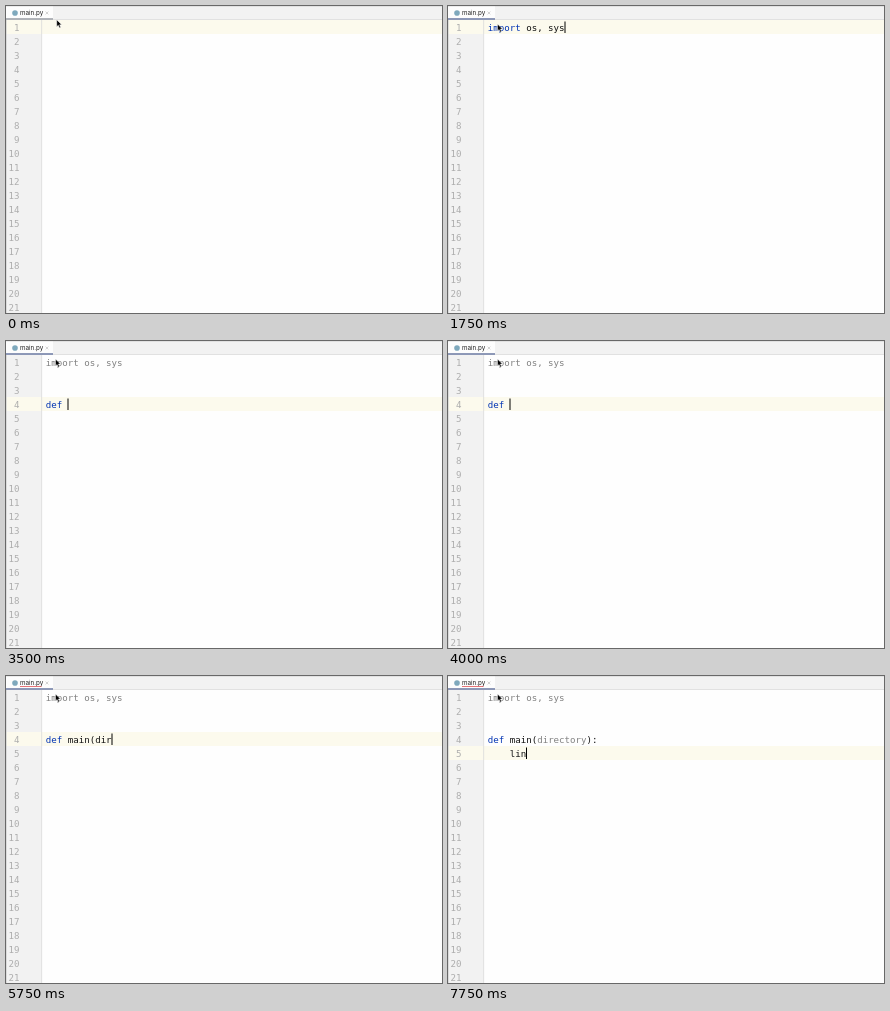
Animation, 436 px wide and 307 px high, one loop 8 s. Source, as an HTML page:

```html
<!DOCTYPE html>
<html lang="en">
<head>
<meta charset="utf-8">
<title>Code completion</title>
<style>
html, body { margin: 0; height: 100%; overflow: hidden; background: #fefefe; }
svg { display: block; }
text { font: 9.13px "DejaVu Sans Mono", "Noto Sans Mono", monospace; white-space: pre; fill: #111; }
.ui { font: 6.3px Inter, Roboto, sans-serif; fill: #222; }
.num { fill: #adadad; text-anchor: end; }
.k { fill: #0033b3; }
.g { fill: #808080; }
.m { fill: #2a62c0; }
.end { text-anchor: end; }
</style>
</head>
<body>
<svg id="stage" width="436" height="307" viewBox="0 0 436 307"></svg>
<script>
const CHAR = 5.5, LEFT = 39.7, LINE = 14, ROW = 12.55, LOOP = 8000;
const stage = document.getElementById('stage');

const rect = (x, y, w, h, fill, more = '') =>
  `<rect x="${x}" y="${y}" width="${w}" height="${h}" fill="${fill}" ${more}/>`;
const text = (x, y, s, cls = '') => `<text x="${x}" y="${y}" class="${cls}">${s}</text>`;
const span = (cls, s) => `<tspan class="${cls}">${s}</tspan>`;
const dot = (x, y, r, fill) => `<circle cx="${x}" cy="${y}" r="${r}" fill="${fill}"/>`;
const plain = s => s.replace(/<[^>]*>/g, '');

// Popup: col is where the typed prefix starts, line is the edited line.
const popup = (col, line, prefix, w, h, items, hint) => ({ col, line, prefix, w, h, items, hint });
const pops = {
  imp: popup(0, 1, 'i', 265, 155, ['import os, sys', 'import os', 'import sys', 'import re', 'import json',
    'import argparse', 'import time', 'import math', 'import random', 'import csv', 'import logging', 'import glob']),
  def: popup(0, 4, 'd', 265, 155, ['def ', 'def main():', 'def main(argv):', 'def main(args):', 'def run():',
    'def read(path):', 'def usage():', 'def walk(path):', 'def parse():', 'def test():', 'def init():', 'def load():']),
  name: popup(4, 4, '', 251, 137, ['main():', 'main(argv):', 'main(args):', 'main(argv=None):', 'main() -> None:',
    'usage():', 'run():', 'walk(path):', 'parse():', 'read(path):']),
  main: popup(4, 4, 'main', 225.5, 155, ['main', 'main():', 'main(argv=None):', 'main(args):', 'main() -> None:',
    'main() -> None:"""', 'main(argv):', 'main(argv=None): ->', 'main(argv=None): :', 'main(argv=None): >>',
    'main(argv=None): as', 'main(opts):'], "if __name__ == '__main__'"),
  dir: popup(9, 4, 'dir', 265, 137, ['directory', 'dir', 'dirname', 'dir_path', 'dirs', 'directory=None',
    'directories', 'dir_name', 'directory: str', 'dirpath'])
};

const imp = span('k', 'import') + ' os, sys';
const grey = span('g', 'import os, sys');
const def = span('k', 'def');
const top4 = s => [grey, '', '', s];
const sig = top4(def + ' main(directory):');
const used = top4(`${def} main(${span('g', 'directory')}):`);

// [start ms, lines (caret sits at the end of the last), popup]
const steps = [
  [0, ['']],
  [750, ['i']],
  [1250, ['i'], 'imp'],
  [1750, [imp]],
  [2000, [grey]],
  [2250, [grey, '', '']],
  [2500, top4('')],
  [2750, top4('d')],
  [3250, top4('d'), 'def'],
  [3500, top4(def + ' ')],
  [3750, top4(def + ' '), 'name'],
  [4000, top4(def + ' ')],
  [4250, top4(def + ' main')],
  [4500, top4(def + ' main'), 'main'],
  [4750, top4(def + ' main(')],
  [5500, top4(def + ' main(d')],
  [5750, top4(def + ' main(dir')],
  [6250, top4(def + ' main(dir'), 'dir'],
  [6500, top4(def + ' main(directory')],
  [6750, [...sig, '    ']],
  [7250, [...used, '    ']],
  [7500, [...used, '    l']],
  [7750, [...used, '    lin']]
];

function drawPopup({ col, line, prefix, w, h, items, hint }) {
  const x = LEFT + col * CHAR - 13.5, y = (line + 1) * LINE + .3, list = h - 11;
  const rows = items.map((s, i) => {
    const base = i * ROW + 9.6, own = hint && !i;
    return (own ? '' : dot(7.5, base - 3.2, 3, '#4a8fc4')) +
      text(13.5, base, span('m', prefix) + s.slice(prefix.length) + (own ? '' : span('g', '  gpt'))) +
      text(w - 6.5, base, own ? hint : 'full-line', 'g end');
  }).join('');
  const bar = items.length > 10 ? rect(w - 5.2, 1, 3.7, 116, '#858585', 'rx="1"') : '';
  return rect(x - 1, y + 1, w + 2, h + 2, '#000', 'rx="3" opacity=".07"') +
    rect(x, y, w, h, '#f6f8fa', 'rx="2" stroke="#c4c4c4" stroke-width=".7"') +
    `<svg x="${x}" y="${y}" width="${w}" height="${list}" overflow="hidden">` +
    rect(.5, .3, w - 6, ROW, '#c5dffc', 'rx="1"') + rows + bar + '</svg>' +
    rect(x + .4, y + list, w - .8, 10.6, '#f2f2f2') +
    `<g transform="translate(${x} ${y + list})">` +
    `<text x="3" y="7.4" class="ui" style="font-size:5.6px;fill:#777">Press ⏎ to insert, ⇥ to replace</text>` +
    [3.2, 5.2, 7.2].map(v => dot(w - 7, v, .6, '#666')).join('') + '</g>';
}

function draw(t) {
  const [, lines, pop] = steps.findLast(s => s[0] <= t);
  const focus = t >= 250, n = lines.length, y = n * LINE;
  const caretX = LEFT + plain(lines[n - 1]).length * CHAR;
  let out = rect(0, 0, 436, 307, '#fefefe') + rect(0, 13, 35.5, 294, '#f2f2f2') +
    rect(0, y, 436, LINE, '#fcfaed') + rect(35.3, 13, .8, 294, '#dadada') +
    rect(0, 13, .7, 294, '#d2d2d2');
  for (let i = 1; i <= 21; i++) out += text(13.6, i * LINE + 10.8, i, 'num');
  lines.forEach((s, i) => out += text(LEFT, i * LINE + 24.5, s));
  if (focus) out += rect(caretX - .2, y + 1.5, 1, 11.5, '#000');

  // tab strip
  out += rect(0, 0, 436, 13, '#f2f2f2') + rect(0, 13, 436, .7, '#d6d6d6') +
    rect(0, 0, 436, .6, '#d8d8d8') + rect(0, .6, 47, 13, '#fdfdfd') +
    rect(0, 12.2, 47, 1.6, focus ? '#7482a8' : '#a0a4aa') +
    dot(9, 7, 2.8, '#7fa9bd') + text(14, 9.2, 'main.py', 'ui') +
    '<path d="M39.6 5.6l2.8 2.8m0-2.8l-2.8 2.8" stroke="#b8b8b8" stroke-width=".6"/>';
  if (t >= 5500) out += rect(14, 10.1, 21.5, .8, '#e0555a');

  if (pop) out += drawPopup(pops[pop]);
  const [mx, my] = focus ? [49.5, 18] : [50.7, 13.7];
  return out + `<path transform="translate(${mx} ${my})" d="M0 0v7l1.6-1.4 1.2 2.6 1.2-.6-1.1-2.5h2.1z" ` +
    'fill="#000" stroke="#fff" stroke-width=".5"/>';
}

const marks = [250, ...steps.map(s => s[0])].sort((a, b) => a - b);
const start = performance.now();
let shown = -1;
function frame() {
  const t = (performance.now() - start) % LOOP;
  const mark = marks.findLast(m => m <= t);
  if (mark !== shown) stage.innerHTML = draw(shown = mark);
  requestAnimationFrame(frame);
}
frame();
</script>
</body>
</html>
```
